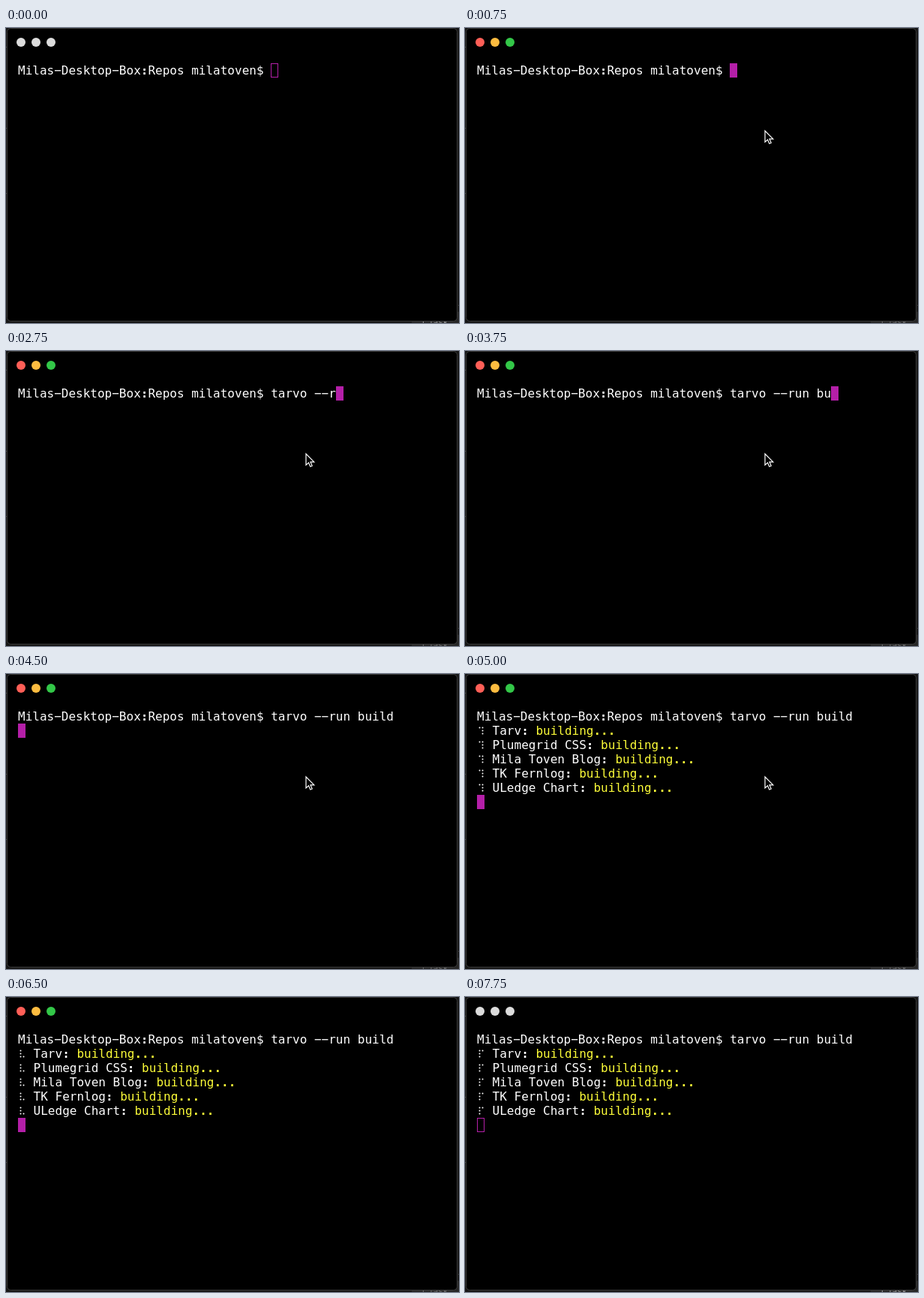
An HTML page that plays this animation: 604x393 px, repeating every 8 s.

```html
<!DOCTYPE html>
<html lang="en">
<head>
<meta charset="utf-8">
<title>Terminal build</title>
<style>
  html, body { margin: 0; width: 100%; height: 100%; overflow: hidden; background: #161616; }
  svg { display: block; }
  text { white-space: pre; font: 16px "DejaVu Sans Mono", monospace; fill: #fff; }
  .busy { fill: #fdfd38; }
  .mark { font-weight: bold; }
  #status { font: 12.5px Inter, sans-serif; fill: #666; }
  .blurred #status { fill: #8c8c8c; }
  #lights :nth-child(1) { fill: #ff5f57; }
  #lights :nth-child(2) { fill: #fdbc40; }
  #lights :nth-child(3) { fill: #33c748; }
  .blurred #lights circle { fill: #dcdcdc; }
  #caret { fill: #b41fa8; }
  .blurred #caret { fill: none; stroke: #b41fa8; }
</style>
</head>
<body>
<svg id="stage" width="604" height="393" viewBox="0 0 604 393">
  <rect width="604" height="393" fill="#161616"/>
  <path d="M0 25.5h1M0 133.5h1M0 220.5h1M603 369.5h1" stroke="#444"/>
  <rect x="541" y="378" width="63" height="15" fill="#262626"/>
  <text id="status" x="553" y="396">1: task</text>
  <rect x="1.5" y=".5" width="600" height="390" rx="5" stroke="#3c3c3c"/>
  <g id="lights">
    <circle cx="20" cy="19" r="6"/>
    <circle cx="40" cy="19" r="6"/>
    <circle cx="60" cy="19" r="6"/>
  </g>
  <defs><g id="spinner" fill="#fff"></g></defs>
  <text id="prompt" x="16" y="62"></text>
  <g id="jobs"></g>
  <rect id="caret"/>
  <path id="mouse" d="M0 0V15L3.5 11.8 5.8 17 8.2 16 6 10.9H10.8Z" fill="#000" stroke="#fff" stroke-width="1.2"/>
</svg>
<script>
  const LOOP = 8000, STEP = 250, CELL = 9.632, LINE = 19, LEFT = 16;
  // Minus signs stand for the terminal font's long hyphens.
  const PROMPT = "Milas−Desktop−Box:Repos milatoven$ ";
  const COMMAND = "tarvo −−run build";
  const JOBS = ["Tarv", "Plumegrid CSS", "Mila Toven Blog", "TK Fernlog", "ULedge Chart"];
  const SPINNER = "⠋⠙⠹⠸⠼⠴⠦⠧⠇⠏";
  const ENTER = 4500, BUILD = 4800, FOCUS = 750, BLUR = 7250;

  // [time, characters typed]
  const typing = [[0, 0], [1000, 1], [1250, 2], [1500, 4], [1750, 5], [2000, 6], [2500, 8], [2750, 9],
    [3000, 11], [3250, 12], [3500, 13], [3750, 14], [4000, 16], [4250, 17]];
  // [time, x, y]; no position means off stage
  const pointer = [[0], [250, 403, 330], [500, 400, 210], [750, 400, 137],
    [5500, 402, 112], [5750, 407, 58], [6000, 410, 10], [6250]];

  const [stage, prompt, jobs, spinner, caret, mouse] =
    ["stage", "prompt", "jobs", "spinner", "caret", "mouse"].map(id => document.getElementById(id));

  // The terminal font has heavy colons and full stops.
  const withMarks = text => text.replace(/[:.]+/g, '<tspan class="mark">$&</tspan>');

  jobs.innerHTML = JOBS.map((name, i) => {
    const y = (i + 1) * LINE;
    return `<use href="#spinner" y="${y}"/><text x="36.6" y="${62 + y}">${withMarks(name + ": ")}` +
      `<tspan class="busy">${withMarks("building...")}</tspan></text>`;
  }).join("");

  // Braille dots run down the left column, then down the right.
  spinner.innerHTML = Array.from({ length: 6 }, (_, i) =>
    `<circle cx="${i < 3 ? 19.5 : 23.5}" cy="${52.5 + i % 3 * 4}" r="1"/>`).join("");

  const show = (node, on) => node.setAttribute("visibility", on ? "visible" : "hidden");
  const latest = (keys, t) => keys.filter(key => key[0] <= t).pop();

  function setCaret(column, row, focused) {
    const inset = focused ? 0 : 0.5;
    const x = Math.round(LEFT + column * CELL) + inset;
    const box = { x, y: 47 + row * LINE + inset, width: 10 - 2 * inset, height: 19 - 2 * inset };
    for (const key in box) caret.setAttribute(key, box[key]);
  }

  function render(t) {
    const focused = t >= FOCUS && t < BLUR;
    const building = t >= BUILD;
    stage.classList.toggle("blurred", !focused);

    const typed = latest(typing, t)[1];
    prompt.innerHTML = withMarks(PROMPT + COMMAND.slice(0, typed));
    if (t < ENTER) setCaret(PROMPT.length + typed, 0, focused);
    else setCaret(0, building ? JOBS.length + 1 : 1, focused);

    show(jobs, building);
    if (building) {
      const turn = Math.floor((t - BUILD) / 100 + 0.2) % SPINNER.length;
      const dots = SPINNER.charCodeAt(turn) - 0x2800;
      [...spinner.children].forEach((dot, i) => dot.setAttribute("opacity", dots >> i & 1));
    }

    const [, x, y] = latest(pointer, t);
    show(mouse, x !== undefined);
    if (x !== undefined) mouse.setAttribute("transform", `translate(${x} ${y})`);
  }

  const start = performance.now();
  function tick() {
    const t = (performance.now() - start) % LOOP;
    render(Math.floor(t / STEP) * STEP);
    requestAnimationFrame(tick);
  }
  tick();
</script>
</body>
</html>
```
